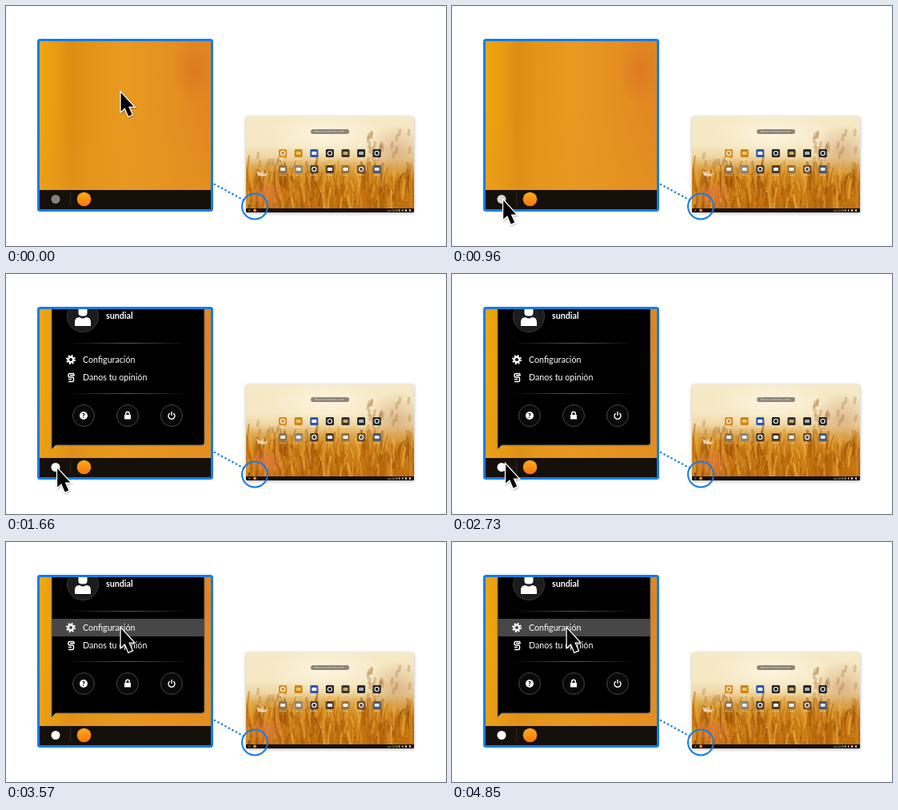
Write an HTML page that moves like this. It is 550 px wide and 300 px high and loops after 7080 ms.

```html
<!DOCTYPE html>
<html lang="es">
<head>
<meta charset="utf-8">
<title>Menú</title>
<style>
  html, body { margin: 0; width: 100%; height: 100%; overflow: hidden; background: #fff; }
  svg { display: block; width: 550px; height: 300px; }
  text { font-family: Lato, sans-serif; }
  #menu text { font-size: 10.7px; fill: #fff; }
  #apps text { font-size: 2.6px; fill: #fff; text-anchor: middle; }
</style>
</head>
<body>
<svg viewBox="0 0 550 300">
  <defs>
    <linearGradient id="wall">
      <stop offset="0" stop-color="#eea60f"/>
      <stop offset=".1" stop-color="#e89c11"/>
      <stop offset=".18" stop-color="#dd8d13"/>
      <stop offset=".3" stop-color="#e39518"/>
      <stop offset=".5" stop-color="#e99a21"/>
      <stop offset=".75" stop-color="#e59122"/>
      <stop offset="1" stop-color="#e08722"/>
    </linearGradient>
    <linearGradient id="shade" x2="0" y2="1">
      <stop offset=".4" stop-color="#e5951f" stop-opacity="0"/>
      <stop offset="1" stop-color="#e5951f" stop-opacity=".6"/>
    </linearGradient>
    <radialGradient id="glow">
      <stop offset="0" stop-color="#d8691f" stop-opacity=".5"/>
      <stop offset="1" stop-color="#d8691f" stop-opacity="0"/>
    </radialGradient>
    <linearGradient id="ball" x2="0" y2="1">
      <stop offset="0" stop-color="#ffab1c"/>
      <stop offset="1" stop-color="#f5750c"/>
    </linearGradient>
    <linearGradient id="rule">
      <stop offset="0" stop-color="#8a8060" stop-opacity="0"/>
      <stop offset=".5" stop-color="#8a8060" stop-opacity=".7"/>
      <stop offset="1" stop-color="#8a8060" stop-opacity="0"/>
    </linearGradient>
    <linearGradient id="field" x2="0" y2="1">
      <stop offset="0" stop-color="#f5e9c6"/>
      <stop offset=".3" stop-color="#f6e8c3"/>
      <stop offset=".42" stop-color="#efd7a4"/>
      <stop offset=".54" stop-color="#dba347"/>
      <stop offset=".68" stop-color="#cd8118"/>
      <stop offset="1" stop-color="#bd6a0c"/>
    </linearGradient>
    <radialGradient id="sun">
      <stop offset="0" stop-color="#fff7e4" stop-opacity=".8"/>
      <stop offset="1" stop-color="#fff7e4" stop-opacity="0"/>
    </radialGradient>
    <radialGradient id="haze">
      <stop offset="0" stop-color="#cf9d6c" stop-opacity=".6"/>
      <stop offset="1" stop-color="#cf9d6c" stop-opacity="0"/>
    </radialGradient>
    <radialGradient id="ember">
      <stop offset="0" stop-color="#e0743c" stop-opacity=".75"/>
      <stop offset="1" stop-color="#e0743c" stop-opacity="0"/>
    </radialGradient>
    <clipPath id="zoomClip"><path d="M42 44h214v210h-214z"/></clipPath>
    <clipPath id="deskClip"><rect x="300" y="138" width="210" height="120" rx="1.5"/></clipPath>
    <filter id="soft" x="-20%" y="-20%" width="140%" height="140%">
      <feDropShadow dx="0" dy="1" stdDeviation="2" flood-opacity=".3"/>
    </filter>
    <filter id="blur"><feGaussianBlur stdDeviation=".7"/></filter>
    <filter id="drop" x="-50%" y="-50%" width="200%" height="200%">
      <feDropShadow dx=".5" dy="1" stdDeviation=".8" flood-opacity=".35"/>
    </filter>
  </defs>

  <!-- small desktop -->
  <rect x="300" y="138" width="210" height="120" rx="1.5" fill="#f5e9c6" filter="url(#soft)"/>
  <g clip-path="url(#deskClip)">
    <path d="M300 138h210v120h-210z" fill="url(#field)"/>
    <ellipse cx="400" cy="160" rx="75" ry="30" fill="url(#sun)"/>
    <ellipse cx="488" cy="182" rx="38" ry="34" fill="url(#haze)"/>
    <g id="grass" fill="none" stroke-linecap="round" filter="url(#blur)"/>
    <ellipse cx="326" cy="236" rx="24" ry="20" fill="url(#ember)"/>
    <path d="M313 206l6 3 2-4 1 5 6-1-5 4-8-1z" fill="#f0dfcf" opacity=".85"/>
    <rect x="381" y="154" width="48" height="6" rx="3" fill="#8b857a"/>
    <text x="386" y="158.2" font-size="3.4" fill="#ddd8cc">Buscar en internet y más</text>
    <g id="apps"/>
    <path d="M300 253h210v5h-210z" fill="#15100a"/>
    <circle cx="304.300" cy="255.500" r="1" fill="#888"/>
    <circle cx="311" cy="255.500" r="1.900" fill="url(#ball)"/>
    <text x="477" y="256.700" font-size="3" fill="#ddd">Lun 12:30</text>
    <path d="M491 254.500h1.500v2h-1.500zM495 254.500h1.500v2h-1.500zM499 254.200h2v2.500h-2zM504 254.200h2v2.500h-2z" fill="#ddd"/>
  </g>

  <!-- magnifier link -->
  <g fill="none" stroke="#137de8">
    <path d="M261 223L298 243" stroke-width="2.600" stroke-linecap="round" stroke-dasharray="0 5.100"/>
    <circle cx="311" cy="250.500" r="16" stroke-width="2"/>
  </g>

  <!-- zoomed corner -->
  <g clip-path="url(#zoomClip)">
    <path d="M42 44h214v210h-214z" fill="url(#wall)"/>
    <path d="M42 44h214v210h-214z" fill="url(#shade)"/>
    <ellipse cx="233" cy="80" rx="26" ry="45" fill="url(#glow)"/>
    <g id="menu" opacity="0">
      <path d="M57 40H248V211q0 3-3 3H62L57 219Z" fill="#000" stroke="#77736a"/>
      <path id="row" d="M57.500 96h190v22h-190z" fill="#fff" opacity="0"/>
      <circle cx="96" cy="53" r="19.500" fill="#1c1c1c" stroke="#3a3a3a"/>
      <rect x="90.500" y="40" width="11" height="12.500" rx="4" fill="#fff"/>
      <path d="M86 65v-5q0-6 6-6q4 3 8 0q6 0 6 6v5z" fill="#fff"/>
      <text x="125" y="56" font-weight="700">sundial</text>
      <path d="M75 86h155v1h-155zM75 149h155v1h-155z" fill="url(#rule)"/>
      <g fill="none" stroke="#fff">
        <circle cx="81" cy="107" r="3.200" stroke-width="2.400"/>
        <circle cx="81" cy="107" r="5" stroke-width="2" stroke-dasharray="2 1.927"/>
        <path d="M85 124.500h-5.500q-1.500 0-1.500 1.500v1.500q0 1.500 1.500 1.500h3.500q1.500 0 1.500 1.500v2.500q0 1.500-1.500 1.500h-5M78 131.500h4M80 126.700h5v-2" stroke-width="1.500"/>
      </g>
      <text x="96" y="111">Configuración</text>
      <text x="96" y="133">Danos tu opinión</text>
      <g fill="#090909" stroke="#464646">
        <circle cx="97" cy="177" r="13.500"/>
        <circle cx="152" cy="177" r="13.500"/>
        <circle cx="207" cy="177" r="13.500"/>
      </g>
      <circle cx="97" cy="177" r="5" fill="#fff"/>
      <text x="97" y="180" text-anchor="middle" style="font-size:8px;font-weight:900;fill:#000">?</text>
      <path d="M148 176h8v5.500h-8z" fill="#fff"/>
      <g fill="none" stroke="#fff" stroke-width="1.400">
        <path d="M149.700 176.500v-2a2.300 2.300 0 0 1 4.600 0v2"/>
        <path d="M204.700 174.100a4 4 0 1 0 4.600 0M207 172v5"/>
      </g>
    </g>
    <path d="M42 230h214v24h-214z" fill="#15100a"/>
    <path d="M80 233h1v17h-1z" fill="#2e2a24"/>
    <circle id="launcher" cx="62" cy="241.500" r="5.500"/>
    <circle cx="97.500" cy="241.500" r="8.800" fill="url(#ball)"/>
  </g>
  <rect x="40.500" y="42.500" width="217" height="213" rx="2" fill="none" stroke="#137de8" stroke-width="3"/>

  <path id="cursor" d="M0 0V23.500L5 19L9.500 29.500L14 27.500L9.500 17.500H16Z"
    stroke="#fff" stroke-width="2.500" paint-order="stroke" filter="url(#drop)"/>
</svg>
<script>
const $ = id => document.getElementById(id);
const clamp = v => Math.max(0, Math.min(1, v));
const progress = (t, start, end) => clamp((t - start) / (end - start));

function add(parent, tag, attrs, text) {
  const el = document.createElementNS('http://www.w3.org/2000/svg', tag);
  for (const key in attrs) el.setAttribute(key, attrs[key]);
  if (text) el.textContent = text;
  parent.append(el);
}

let seed = 11;
const random = () => (seed = seed * 16807 % 2147483647) / 2147483647;

function drawGrass() {
  const tones = ['#a4560a', '#c87410', '#e09a2a', '#efb545', '#8c4806', '#b8660c'];
  for (let i = 0; i < 300; i++) {
    const x = 300 + random() * 210, y = 216 + random() * 44;
    const h = 12 + random() * 22, lean = (random() - .5) * 12;
    add($('grass'), 'path', {
      d: `M${x} ${y}q0 ${-h / 2} ${lean} ${-h}`,
      stroke: tones[Math.floor(random() * tones.length)],
      'stroke-width': 1 + random() * 2.5, opacity: .25 + random() * .4
    });
  }
  // hazy seed heads, mostly on the right
  for (let i = 0; i < 32; i++) {
    const x = i < 24 ? 452 + random() * 56 : 301 + random() * 50;
    const y = i < 24 ? 154 + random() * 40 : 182 + random() * 16;
    add($('grass'), 'path', {
      d: `M${x} ${y}l-1 6`, stroke: '#a9763c', 'stroke-width': 3.5, opacity: .32
    });
  }
}

function drawApps() {
  const apps = [
    ['Internet', '#d98a25', '#fff0d0'], ['Archivos', '#c98618', '#f2c258'],
    ['Textos', '#2f56b0', '#fff'], ['Música', '#191919', '#ddd'],
    ['Fotos', '#38332c', '#c9a968'], ['Videos', '#26282c', '#aab4bc'],
    ['Juegos', '#191b20', '#e4e4e4'], ['Recetas', '#8d7554', '#f4ede0'],
    ['Salud', '#87837a', '#f0ede4'], ['Mandos', '#41372b', '#eee'],
    ['Ayuda', '#4c3b26', '#fff'], ['Ideas', '#98713b', '#fff'],
    ['Viajes', '#66482a', '#eee'], ['Mundo', '#4b5968', '#d9e4ec']
  ];
  apps.forEach(([name, back, front], i) => {
    const x = 346 + i % 7 * 19.6, y = i < 7 ? 184 : 204;
    add($('apps'), 'rect', { x: x - 5, y: y - 5, width: 10, height: 10, rx: 1.5, fill: back });
    if (i % 3) add($('apps'), 'rect', { x: x - 3, y: y - 2, width: 6, height: 4, rx: 1, fill: front });
    else add($('apps'), 'circle', { cx: x, cy: y, r: 2.6, fill: 'none', stroke: front, 'stroke-width': 1.3 });
    add($('apps'), 'text', { x, y: y + 8 }, name);
  });
}

function draw(now) {
  const t = now % 7080;
  const away = progress(t, 0, 920) - progress(t, 2700, 3540);
  $('cursor').setAttribute('transform', `translate(${143.7 - 79.5 * away} ${108 + 135 * away})`);

  const grey = 130 + 125 * progress(t, 900, 990);
  $('launcher').setAttribute('fill', `rgb(${grey},${grey},${grey})`);
  $('menu').setAttribute('opacity', progress(t, 1350, 1660) ** 3);

  const click = 1 - Math.abs(2 * progress(t, 4610, 4850) - 1);
  $('row').setAttribute('opacity', .28 * progress(t, 3450, 3570) + .15 * click);
  requestAnimationFrame(draw);
}

drawGrass();
drawApps();
draw(performance.now());
</script>
</body>
</html>
```
